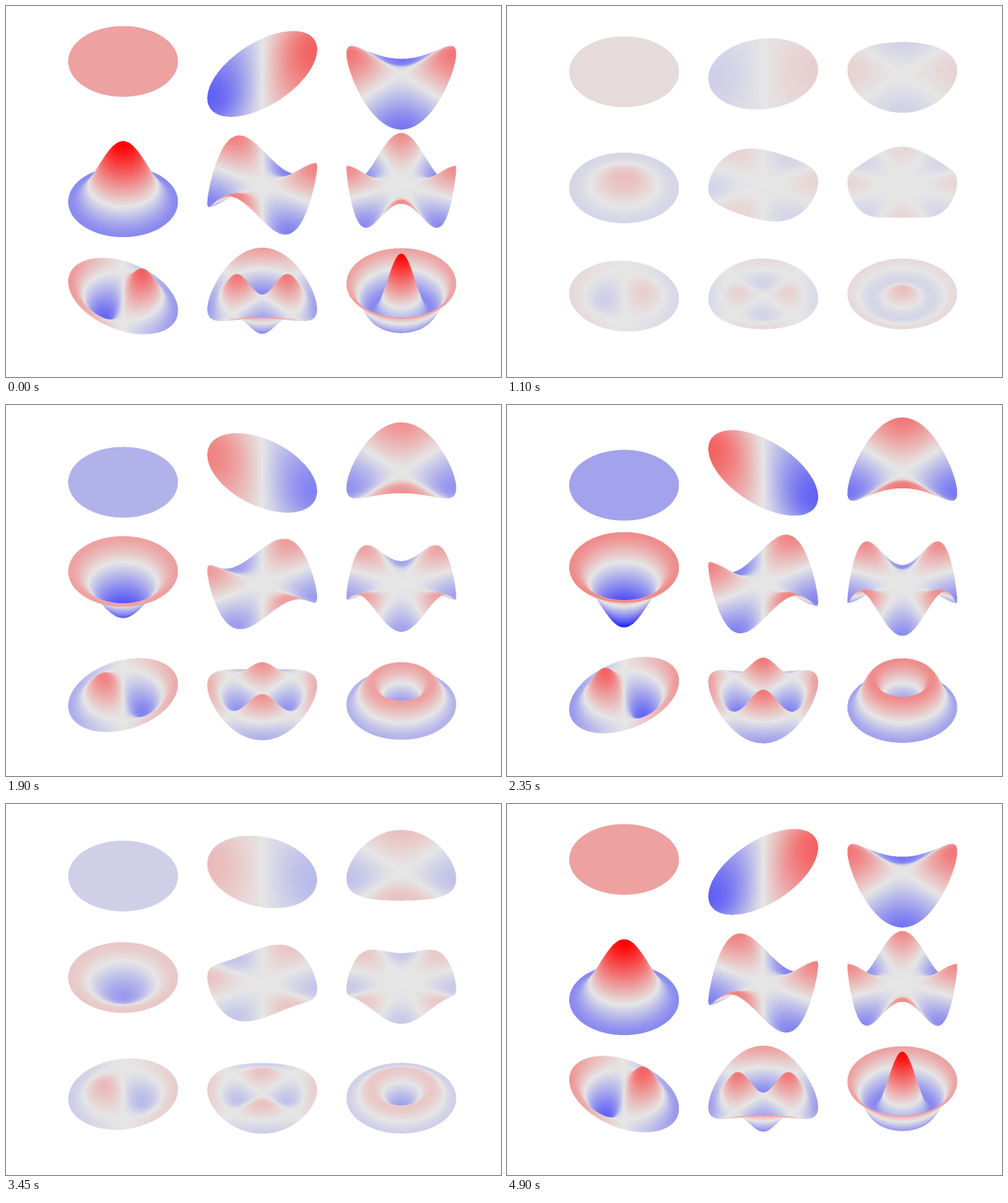
Write a matplotlib script that moves like this. It is 700 by 525 pixels and loops after 4950 ms.

```python
from functools import lru_cache

import matplotlib.pyplot as plt
import numpy as np
from matplotlib.animation import FuncAnimation

W, H = 700, 525
FRAMES, INTERVAL = 99, 50
SS = 2                      # supersampling factor
RX, RY = 77.6, 49.8         # projected disc radii in pixels
LIFT = 59.0                 # pixels per unit of height
COLS = (165.6, 362.3, 559.0)
ROWS = (96.1, 253.3, 410.5)
LEVELS = 1000

# (angular order, radial wavenumber), sorted by wavenumber
MODES = [(0, 0.0), (1, 1.8412), (2, 3.0542),
         (0, 3.8317), (3, 4.2012), (4, 5.3176),
         (1, 5.3314), (2, 6.7061), (0, 7.0156)]


def bessel(m, x):
    """Bessel function of the first kind from its integral form."""
    t = np.arange(64) * 2 * np.pi / 64
    return np.cos(m * t - np.outer(x, np.sin(t))).mean(axis=1)


def height(m, k, x, y):
    if k == 0:
        return np.full(x.shape, 0.3)
    r = np.linspace(0, 1, 600)
    radial = np.interp(np.hypot(x, y), r, bessel(m, k * r))
    return radial * np.cos(m * np.arctan2(y, x))


def build_surface(index):
    """Sample one disc column by column, ordered from back to front."""
    cx, cy = COLS[index % 3], ROWS[index // 3]
    first = int(np.ceil((cx - RX) * SS - 0.5))
    last = int(np.floor((cx + RX) * SS - 0.5))
    col = np.arange(first, last + 1)
    x = ((col + 0.5) / SS - cx) / RX
    depth = np.linspace(1, -1, 1200)[:, None]
    y = depth * np.sqrt(np.clip(1 - x**2, 0, None))
    x, col = np.broadcast_to(x, y.shape), np.broadcast_to(col, y.shape)
    z = height(*MODES[index], x, y)
    row = SS * (cy - RY * y)
    return (row.ravel().astype(np.float32), col.ravel(),
            z.ravel().astype(np.float32))


def build_palette():
    """Blue - light grey - red ramp; entry 0 is the white background."""
    v = np.linspace(-1, 1, 2 * LEVELS + 1)[:, None]
    ends = np.where(v > 0, [255, 0, 0], [0, 0, 255])
    ramp = 229.5 + (ends - 229.5) * np.abs(v)
    return np.vstack([[255, 255, 255], ramp]).astype(np.float32)


SURFACES = [build_surface(i) for i in range(9)]
PALETTE = build_palette()


@lru_cache(maxsize=None)
def render(step):
    swing = np.float32(np.cos(2 * np.pi * step / FRAMES))
    canvas = np.zeros(H * SS * W * SS, dtype=np.uint16)
    for row, col, z in SURFACES:
        v = swing * z
        line = (row - SS * LIFT * v).astype(np.int32)
        # later (nearer) samples overwrite earlier ones
        canvas[line * (W * SS) + col] = (v * LEVELS + LEVELS + 1.5).astype(np.uint16)
    fine = PALETTE[canvas.reshape(H * SS, W * SS)]
    total = sum(fine[i::SS, j::SS] for i in range(SS) for j in range(SS))
    return (total / SS**2 + 0.5).astype(np.uint8)


def update(n):
    image.set_data(render(min(n, FRAMES - n)))
    return (image,)


fig = plt.figure(figsize=(W / 100, H / 100), dpi=100, facecolor="white")
ax = fig.add_axes([0, 0, 1, 1])
ax.axis("off")
image = ax.imshow(render(0), aspect="auto", interpolation="nearest")

anim = FuncAnimation(fig, update, frames=FRAMES, interval=INTERVAL,
                     repeat=True, repeat_delay=0, blit=False)
plt.show()
```
